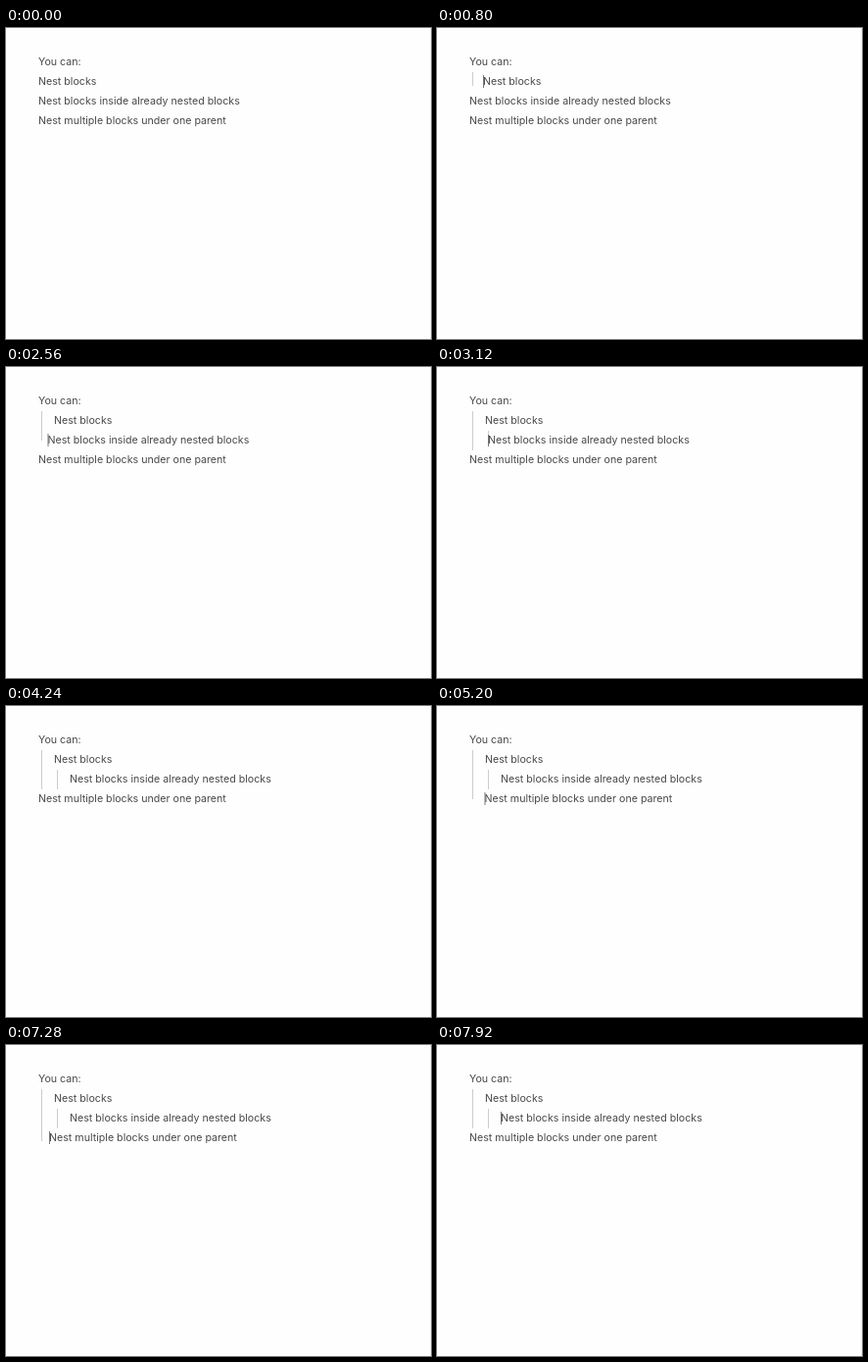
Write an HTML page that moves like this. It is 434 px wide and 317 px high and loops after 8000 ms.

```html
<!DOCTYPE html>
<html lang="en">
<head>
<meta charset="utf-8">
<title>Nested blocks</title>
<style>
/* One loop is 8 s, so 1% is one 80 ms step. */
html, body { margin: 0; width: 100%; height: 100%; overflow: hidden; background: #fefefe; }
#stage {
  position: relative; width: 434px; height: 317px; overflow: hidden;
  font: 10.67px/20px Inter, sans-serif; color: #484848; white-space: nowrap;
}
#stage * { animation: 8s step-end infinite; }
.line { position: absolute; left: 33px; height: 20px; }
.line i { position: absolute; left: 0; top: 3px; width: 1px; height: 13px; background: #777; opacity: 0; }
.rule { position: absolute; width: 1px; height: 0; background: #ccc; }
.edge { position: absolute; right: 0; top: 0; width: 1px; height: 100%; background: #f2f2f2; }

#stage .second { animation-name: second; }
#stage .third { animation-name: third; }
#stage .fourth { animation-name: fourth; }
#stage .second i { animation-name: caret2; }
#stage .third i { animation-name: caret3; }
#stage .fourth i { animation-name: caret4; }
#stage .outer { left: 36px; top: 45px; animation-name: outer; }
#stage .inner { left: 52px; top: 65px; animation-name: inner; }

@keyframes second {
  0% { transform: none; }
  8% { transform: translateX(3px); }
  9% { transform: translateX(9.5px); }
  10% { transform: translateX(14px); }
  11% { transform: translateX(15.5px); }
  12%, 100% { transform: translateX(16px); }
}
@keyframes third {
  0% { transform: none; }
  31% { transform: translateX(3px); }
  32% { transform: translateX(9.5px); }
  33% { transform: translateX(14px); }
  34% { transform: translateX(15.5px); }
  35% { transform: translateX(16px); }
  39% { transform: translateX(19px); }
  40% { transform: translateX(25.5px); }
  41% { transform: translateX(30px); }
  42% { transform: translateX(31.5px); }
  43%, 100% { transform: translateX(32px); }
}
@keyframes fourth {
  0% { transform: none; }
  64% { transform: translateX(8px); }
  65% { transform: translateX(15.5px); }
  66% { transform: translateX(16px); }
  91% { transform: translateX(11px); }
  92% { transform: translateX(3px); }
  93%, 100% { transform: none; }
}
@keyframes caret2 {
  0%, 15%, 100% { opacity: 0; }
  7% { opacity: 1; }
}
@keyframes caret3 {
  0%, 22%, 29%, 37%, 46% { opacity: 0; left: 0; }
  16% { opacity: 1; left: 14px; }
  23%, 31%, 39%, 99%, 100% { opacity: 1; left: 0; }
}
@keyframes caret4 {
  0%, 53%, 61%, 70%, 82%, 98%, 100% { opacity: 0; left: 0; }
  47% { opacity: 1; left: 36px; }
  55%, 64%, 76%, 89% { opacity: 1; left: 0; }
}
@keyframes outer {
  0% { height: 0; }
  8% { height: 4px; }
  9% { height: 9px; }
  10% { height: 14px; }
  11% { height: 18px; }
  12% { height: 20px; }
  31% { height: 24px; }
  32% { height: 30px; }
  33% { height: 35px; }
  34% { height: 38px; }
  35% { height: 40px; }
  64% { height: 44px; }
  65% { height: 50px; }
  66% { height: 56px; }
  67% { height: 60px; }
  91% { height: 53px; }
  92% { height: 45px; }
  93%, 100% { height: 40px; }
}
@keyframes inner {
  0% { height: 0; }
  39% { height: 4px; }
  40% { height: 10px; }
  41% { height: 15px; }
  42% { height: 18px; }
  43%, 100% { height: 20px; }
}
</style>
</head>
<body>
<div id="stage">
  <div class="line" style="top:25px">You can:</div>
  <div class="line second" style="top:45px"><i></i>Nest blocks</div>
  <div class="line third" style="top:65px"><i></i>Nest blocks inside already nested blocks</div>
  <div class="line fourth" style="top:85px"><i></i>Nest multiple blocks under one parent</div>
  <div class="rule outer"></div>
  <div class="rule inner"></div>
  <div class="edge"></div>
</div>
</body>
</html>
```
